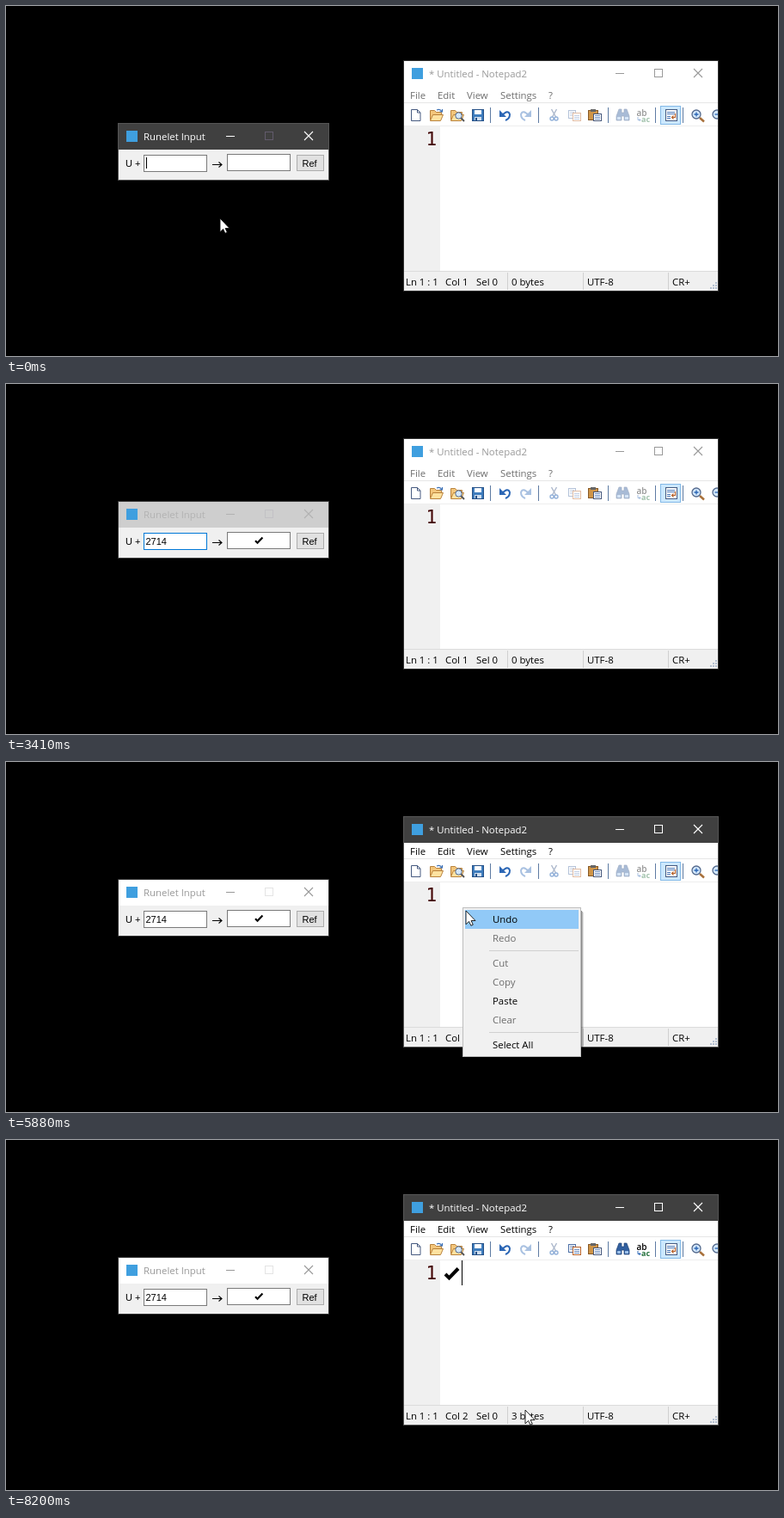
Recreate the animation shown at these times as an HTML page. Size 898 px wide and 407 px high, loop 8.27 s.

```html
<!DOCTYPE html>
<html lang="en">
<head>
<meta charset="utf-8">
<title>Symbol entry demo</title>
<style>
  html, body { margin: 0; width: 100%; height: 100%; overflow: hidden; background: #000; }
  svg { display: block; }
  text { font: 11.4px "Open Sans", "Noto Sans", sans-serif; white-space: pre; }
  rect, .crisp { shape-rendering: crispEdges; }
  .form text { font: 11px "Liberation Sans", Arial, sans-serif; }
  .line { fill: none; }
  .dim { fill: #6d6d6d; }
</style>
</head>
<body>
<svg id="stage" width="898" height="407" viewBox="0 0 898 407"></svg>
<script>
const LOOP = 8270;

// Moments of change: first, last, count
const bursts = [
  [0, 0, 1], [230, 920, 10], [1070, 1150, 2], [1300, 1300, 1], [1850, 1930, 2],
  [2310, 2310, 1], [2750, 2750, 1], [3180, 3560, 6], [4110, 4110, 1], [4340, 5110, 11],
  [5190, 5420, 4], [5570, 5730, 3], [5880, 6420, 8], [6570, 7030, 7], [7740, 7740, 1],
  [7890, 8200, 5]
];
const ticks = bursts.flatMap(([a, b, n]) =>
  Array.from({ length: n }, (_, i) => a + (n > 1 ? i * (b - a) / (n - 1) : 0)));

// Pointer hot spot: time, x, y
const route = [
  [0, 249, 247], [230, 248, 245], [460, 219, 217], [690, 184, 190], [770, 178, 187],
  [920, 178, 187], [1070, 176, 187], [1150, 174, 187], [1930, 174, 187], [4340, 178, 190],
  [4417, 231, 212], [4494, 279, 224], [4648, 394, 209], [4802, 478, 186], [4956, 519, 172],
  [5110, 530, 169], [5730, 530, 169], [5880, 535, 173], [6111, 555, 211], [6343, 575, 267],
  [6420, 578, 275], [7740, 578, 275], [7890, 579, 277], [8045, 590, 297], [8200, 604, 314]
];
const dialogFocus = [[3180, 1], [3332, .25], [3410, .25], [3560, 1], [5110, 1], [5190, 0]];

function sample(keys, t) {
  const i = keys.findIndex(k => k[0] > t);
  if (i === 0) return keys[0].slice(1);
  if (i < 0) return keys.at(-1).slice(1);
  const a = keys[i - 1], b = keys[i], p = (t - a[0]) / (b[0] - a[0]);
  return a.slice(1).map((v, j) => v + (b[j + 1] - v) * p);
}

const text = (x, y, s, extra = '') => `<text x="${x}" y="${y}" ${extra}>${s}</text>`;
const box = (x, y, w, h, fill, stroke, extra = '') => stroke
  ? `<rect x="${x + .5}" y="${y + .5}" width="${w - 1}" height="${h - 1}" fill="${fill}" stroke="${stroke}" ${extra}/>`
  : `<rect x="${x}" y="${y}" width="${w}" height="${h}" fill="${fill}" ${extra}/>`;
const path = (d, fill, stroke = 'none', width = 1, extra = '') =>
  `<path d="${d}" fill="${fill}" stroke="${stroke}" stroke-width="${width}" ${extra}/>`;

function titleLayer(x, y, w, h, name, edge, back, ink, maxInk) {
  const r = x + w;
  return box(x, y, w, h, 'none', edge) + box(x + 1, y + 1, w - 2, 30, back) +
    box(x + 10, y + 9, 13, 13, '#3f9fdf') +
    text(x + 30, y + 20, name, `fill="${ink}"`) +
    box(r - 120, y + 15, 10, 1, ink) +
    box(r - 75, y + 10, 10, 10, 'none', maxInk) +
    path(`M${r - 29} ${y + 10}l10 10m0-10l-10 10`, 'none', ink, 1.1);
}
const titleBar = (id, x, y, w, h, name, lightMax, darkMax) =>
  titleLayer(x, y, w, h, name, '#303030', '#fff', '#999', lightMax) +
  `<g id="${id}">${titleLayer(x, y, w, h, name, '#555', '#404040', '#fff', darkMax)}</g>`;

const check = (x, y, s) =>
  path(`M${x} ${y}l${4.5 * s} ${4.5 * s}l${10.5 * s} ${-11 * s}`, 'none', '#000', 4 * s);

const dialog = () => box(131, 167, 244, 35, '#f0f0f0') +
  titleBar('dialogOn', 130, 136, 246, 67, 'Runelet Input', '#e4e4e4', '#625b6c') +
  `<g class="form">` + text(139, 187, 'U +') +
  box(160, 173, 74, 20, '#fff', '#7a7a7a', 'id="field"') + text(162.5, 187, '', 'id="typed"') +
  box(163, 176, 1, 13, '#000', '', 'id="fieldCaret"') +
  path('M240 184.5h11m-3.500-3l3.500 3l-3.500 3', 'none', '#000', 1.1) +
  box(257, 172, 74, 20, '#fff', '#7a7a7a') + `<g id="result">${check(290, 182.200, .56)}</g>` +
  box(338, 173, 32, 19, '#e1e1e1', '#adadad') + text(344.5, 187, 'Ref') + '</g>';

function toolbar() {
  const undo = path('M577 127q7-7 9-1q0 5-5 7', 'none', '#2b66b5', 2) + path('M574 121v8h8z', '#2b66b5');
  const folder = x => path(`M${x} 132.500v-11h5l2 2h6v3`, '#f3c67c', '#b9823c') +
    path(`M${x} 133.500l3-7h12l-3 7z`, '#ffe2a0', '#b9823c');
  const lens = x => path(`M${x + 4} 130l5 4.500`, 'none', '#a8703a', 2.5) +
    `<circle cx="${x}" cy="126" r="5" fill="#d3e7fb" stroke="#52688c" stroke-width="1.3"/>`;
  const page = (x, y, w, h, ink) => box(x, y, w, h, '#fff', ink);
  const rows = (x, y, w, n, ink) =>
    Array.from({ length: n }, (_, i) => box(x, y + i * 2, w, 1, ink)).join('');
  return `<svg x="463" y="113" width="365" height="27" viewBox="463 113 365 27">` +
    box(463, 113, 365, 27, '#fff') +
    [563, 619, 700, 755, 787].map(x => box(x, 118, 1, 18, '#5e7ba3')).join('') +
    path('M471.500 120.500h7l3.500 3.500v9.500h-10.500zm7 0v3.500h3.500', '#fff', '#465a80') +
    folder(493.5) + path('M501 121q4-2 6 2m-2.500 0h3v-3', 'none', '#3a6fb5', 1.2) +
    folder(517.5) + path('M529 130l4 4', 'none', '#555', 2) +
    `<circle cx="526.5" cy="127.5" r="3.7" fill="#d3e7fb" stroke="#52688c"/>` +
    box(542, 120, 14, 14, '#3f7dbd', '#244f86') + box(545, 121, 8, 5, '#fff') +
    box(545, 129, 8, 4, '#cfdded') + box(546, 130, 2, 3, '#244f86') +
    undo + `<g opacity=".4" transform="translate(1185) scale(-1 1)">${undo}</g>` +
    `<g opacity=".5">` + path('M634.500 120l5 9m1-9l-5 9', 'none', '#60779d', 1.5) +
    path('M633 131a2 2 0 1 1 4 0a2 2 0 1 1-4 0m5 0a2 2 0 1 1 4 0a2 2 0 1 1-4 0', 'none', '#2b66b5', 1.4) + '</g>' +
    `<g id="copyIcon">` + page(654, 121, 9, 10, '#4c6fa6') + rows(656, 123, 5, 3, '#7d9bc7') +
    page(659, 124, 10, 10, '#b8632c') + rows(661, 127, 6, 3, '#6f91c4') + '</g>' +
    box(677, 121, 12, 12, '#cf9548', '#865927') + box(680, 120, 6, 3, '#666') +
    page(683, 125, 10, 9, '#46587c') + rows(685, 127, 6, 3, '#6f91c4') +
    `<g id="findIcon">` + path('M713 120h3v4h3v-4h3l3 8v5h-6v-5h-3v5h-6v-5z', '#315f9f', '#1e3f74', .7) +
    box(711, 129, 4, 3, '#9cc0ea') + box(720, 129, 4, 3, '#9cc0ea') + '</g>' +
    `<g id="swapIcon">` + text(733.5, 127.5, 'ab', 'style="font-size:10px;font-weight:600"') +
    text(739, 135, 'ac', 'fill="#23703c" style="font-size:9px;font-weight:700"') +
    path('M735 129v3.500h3m-1.500-1.500l1.500 1.500l-1.500 1.500', 'none', '#2b66b5') + '</g>' +
    box(761, 116, 24, 22, '#cce8ff', '#83b9e6') + page(767, 120, 14, 14, '#465a80') +
    rows(769, 123, 9, 2, '#4c79b8') + rows(769, 128, 4, 2, '#4c79b8') +
    path('M778.500 125v4.500h-4m2-2l-2 2l2 2', 'none', '#b8632c', 1.2) +
    lens(803) + path('M800.500 126h5m-2.500-2.500v5', 'none', '#2b66b5', 1.3) +
    lens(827) + path('M824.500 126h5', 'none', '#2b66b5', 1.3) + '</svg>';
}

function editor() {
  const heads = [[470, 'File'], [502, 'Edit'], [536, 'View'], [575, 'Settings'], [631, '?']];
  let grip = '';
  for (let r = 0; r < 3; r++)
    for (let c = 0; c <= r; c++) grip += box(825 - c * 3, 321 + r * 3, 2, 2, '#b3bfd0');
  return box(463, 94, 365, 237, '#fff') +
    titleBar('editorOn', 462, 63, 367, 269, '* Untitled - Notepad2', '#999', '#fff') +
    `<g id="menuBar">${heads.map(([x, s]) => text(x, 108, s)).join('')}</g>` +
    toolbar() + box(463, 112, 365, 1, '#e6e6e6') +
    box(463, 139, 365, 1, '#eee') + box(463, 140, 42, 168, '#f0f0f0') +
    text(488.5, 162, '1', `fill="#400000" style="font:21px 'DejaVu Sans Mono',monospace"`) +
    `<g id="pasted">${check(511, 156, 1)}</g>` +
    box(506, 140, 1, 29, '#000', '', 'id="caret"') +
    box(463, 308, 365, 23, '#f0f0f0') + box(463, 308, 365, 1, '#dcdcdc') +
    [583, 671, 770].map(x => box(x, 310, 1, 20, '#d0d0d0')).join('') +
    text(465, 325, 'Ln 1 : 1') + text(511, 325, '', 'id="col"') + text(547, 325, 'Sel 0') +
    text(588, 325, '', 'id="bytes"') + text(676, 325, 'UTF-8') + text(775, 325, 'CR+') + grip;
}

const items = [[172, 'Undo', 1], [194, 'Redo'], [223, 'Cut'], [245, 'Copy'],
  [267, 'Paste', 1], [289, 'Clear'], [318, 'Select All', 1]];
const label = ([y, s, on]) => text(566, y + 15, s, on ? '' : 'class="dim"');

const menu = () => `<g id="menu">` +
  [.45, .28, .12].map((o, i) => box(669 + i, 173 + i, 1, 170 - i, '#000', '', `opacity="${o}"`)).join('') +
  box(531, 169, 138, 174, '#f1f1f1', '#bdbdbd') +
  box(562, 219, 104, 1, '#d0d0d0') + box(562, 314, 104, 1, '#d0d0d0') +
  items.map(label).join('') + '</g>' +
  `<g id="pick">${box(534, 0, 132, 22, '#91c9f7', '', 'id="strip"')}<g id="pickText"></g></g>`;

const pointer = () => `<g id="pointer">` +
  `<circle id="click" r="12" fill="#ff3" fill-opacity=".65"/>` +
  `<g id="arrow">` + path('M0 0V15.800L3.600 12.400L5.900 17.300L8.300 16.200L6.100 11.500H11z', '#fff', '#111', .9) + '</g>' +
  `<g id="beam">` + path('M0-7.500h2.500l1 1l1-1H7M0 7.500h2.500l1-1l1 1H7M3.500-7V7', 'none', '#222', 1) + '</g></g>';

stage.innerHTML = dialog() + editor() + menu() + pointer();

const $ = id => document.getElementById(id);
const show = (id, v) => $(id).setAttribute('opacity', +v);
const set = (id, name, v) => $(id).setAttribute(name, v);
const within = (t, ...spans) => spans.some(([a, b]) => t >= a && t < b);

function draw(now) {
  const t = ticks.findLast(k => k <= now);
  const [x, y] = sample(route, t);
  const pasted = t >= 6640, editing = t >= 5180;
  const menuOpen = within(t, [5645, 6700]);

  // Dialog
  const typed = [1850, 2310, 2750, 3180].filter(k => t >= k).length;
  $('typed').textContent = '2714'.slice(0, typed);
  set('fieldCaret', 'x', 163 + 6 * typed);
  show('fieldCaret', within(t, [0, 300], [760, 1300], [1850, 3250], [3550, 4110], [4640, 5180]));
  set('field', 'stroke', within(t, [760, 5250]) ? '#0078d7' : '#7a7a7a');
  show('result', t >= 3250);
  show('dialogOn', sample(dialogFocus, t)[0]);

  // Editor
  show('editorOn', editing);
  set('menuBar', 'fill', editing ? '#000' : '#6d6d6d');
  show('pasted', pasted);
  set('caret', 'x', pasted ? 530 : 506);
  show('caret', within(t, [5180, 5725], [6260, 7025], [7740, LOOP]));
  for (const id of ['copyIcon', 'findIcon', 'swapIcon']) show(id, pasted ? 1 : .42);
  $('col').textContent = pasted ? 'Col 2' : 'Col 1';
  $('bytes').textContent = pasted ? '3 bytes' : '0 bytes';

  // Popup menu; the chosen entry lingers and fades
  show('menu', menuOpen ? (t < 5725 ? .6 : 1) : 0);
  const hit = items.find(([top]) => y >= top && y < top + 22);
  const fade = t < 6640 ? 1 : Math.max(0, .87 - (t - 6647) / 353);
  show('pick', hit && within(t, [5870, 6945]) ? fade : 0);
  if (hit) {
    set('strip', 'y', hit[0]);
    set('strip', 'fill', hit[2] ? '#91c9f7' : '#e3e3e3');
    $('pickText').innerHTML = label(hit);
  }

  // Pointer
  const inField = x >= 160 && x < 234 && y >= 173 && y < 193;
  const inPage = x >= 505 && x < 828 && y >= 140 && y < 308;
  const beam = !menuOpen && (inField || inPage);
  set('pointer', 'transform', `translate(${Math.round(x)} ${Math.round(y)})`);
  show('pointer', !within(t, [1920, 4330]));
  show('beam', beam);
  show('arrow', !beam);
  show('click', within(t, [760, 915], [5180, 5335], [5560, 5640], [6560, 6640]));
}

function frame() {
  draw(performance.now() % LOOP);
  requestAnimationFrame(frame);
}
frame();
</script>
</body>
</html>
```
